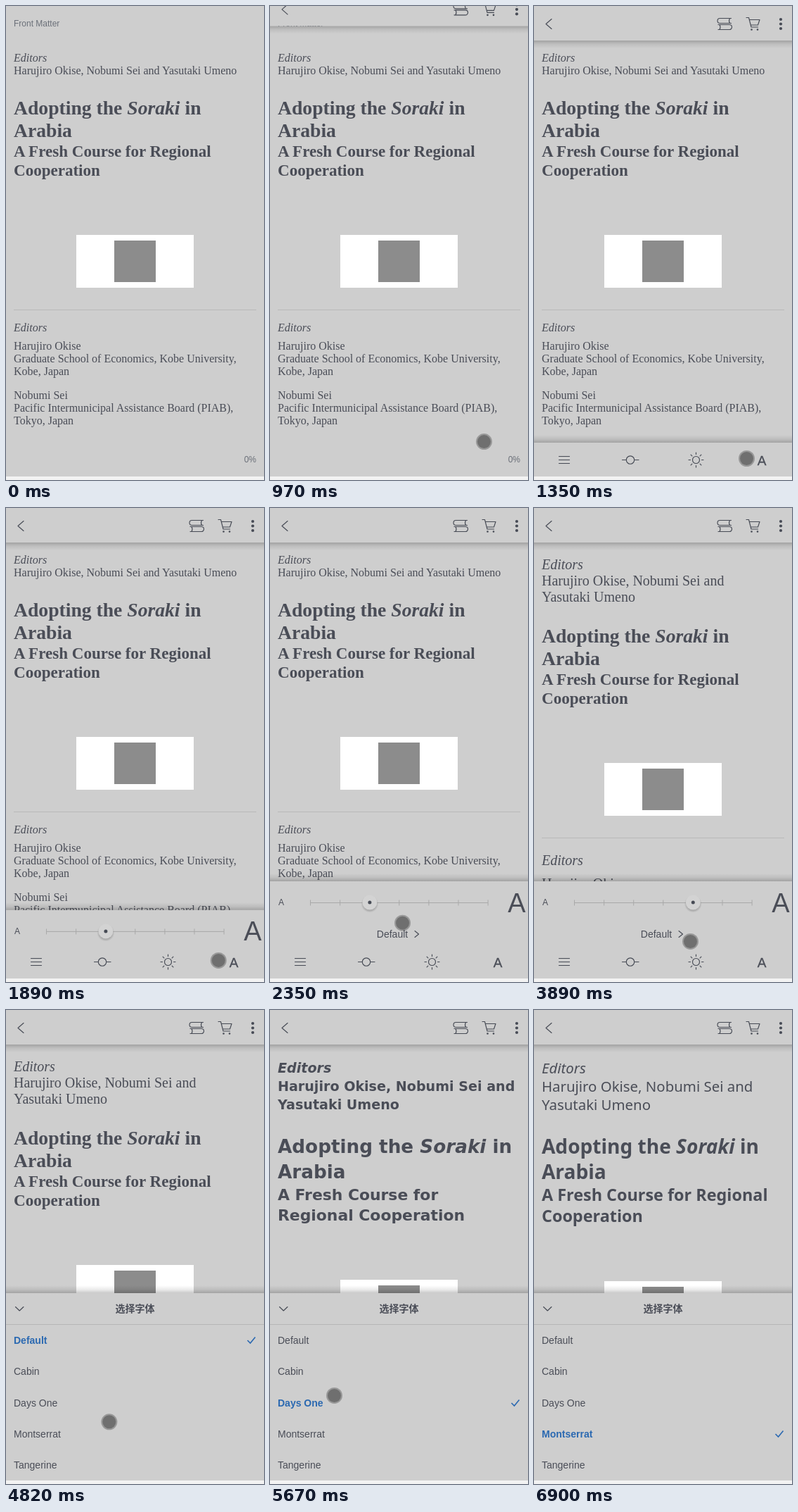
An HTML page for the animation above (7.36 s loop, 367 by 673 pixels).

```html
<!DOCTYPE html>
<html lang="en">
<head>
<meta charset="utf-8">
<title>Reader font settings</title>
<style>
  html, body { margin: 0; width: 100%; height: 100%; overflow: hidden; background: #cecece; }
  svg { display: block; width: 100%; height: 100%; }
  text { white-space: pre; fill: #4a4d57; }
  .ui text { font-family: "Liberation Sans", Arial, sans-serif; }
  .ui .cjk { font: 700 14px "Noto Sans CJK SC", "Noto Sans CJK", sans-serif; }
  .ui .soft { fill: #6b7079; }
  .surface { fill: #cecece; }
  .icon { fill: none; stroke: #474b55; stroke-width: 1.15; stroke-linecap: round; stroke-linejoin: round; }
  .solid { fill: #474b55; }
  .item.on text { fill: #2b69b1; font-weight: 700; }
  .item path { display: none; fill: none; stroke: #2b69b1; stroke-width: 1.6; }
  .item.on path { display: inline; }
</style>
</head>
<body>
<svg id="stage" viewBox="0 0 367 673"></svg>
<script>
const LOOP = 7360;
const SLIDE = 310;
const FONTS = ['Default', 'Cabin', 'Days One', 'Montserrat', 'Tangerine'];
const SERIF = "'Liberation Serif', 'Times New Roman', serif";
const EDITORS = ['Harujiro Okise', 'Nobumi Sei', 'Yasutaki Umeno'];

// lead: body line spacing; top, title, sub: first baselines; head: heading scale; font: chosen list entry
const PAGES = [
  { from: 0, font: 0, size: 16, lead: 18, top: 79, title: 154, sub: 214, logo: 325 },
  { from: 2960, font: 0, size: 18, lead: 21, top: 83, title: 183, sub: 243, logo: 354 },
  { from: 3500, font: 0, size: 20, lead: 23, top: 87, title: 191, sub: 251, logo: 362 },
  { from: 5430, font: 2, size: 19.1, lead: 26, top: 89, title: 203, sub: 270, logo: 383,
    family: "'DejaVu Sans', sans-serif", weight: 700, head: 0.95, titleLead: 36, subLead: 29, breakEarly: true },
  { from: 6360, font: 3, size: 20.4, lead: 26, top: 90, title: 204, sub: 271, logo: 385,
    family: "'Noto Sans', 'Open Sans', sans-serif", head: 1.016, titleLead: 36, subLead: 30 },
];

// time, x, y
const TOUCH = [
  [70, 293, 664], [500, 220, 526], [650, 220, 526], [970, 304.5, 618.5], [1200, 302.5, 642.5],
  [1890, 302.5, 642.5], [2430, 169, 580], [2730, 182, 571], [2960, 183, 569], [3350, 226, 567],
  [3500, 226, 567], [3890, 222.5, 615.5], [4190, 212, 608], [4430, 212, 608], [5120, 97, 567],
  [5430, 92, 563], [5600, 92, 556], [5670, 91.5, 547.5], [5830, 91, 540], [5980, 91, 540],
  [6130, 75, 615], [6360, 75, 613], [6800, 105, 690],
];

const text = (x, y, size, content, attrs = '') =>
  `<text x="${x}" y="${y}" font-size="${size}" ${attrs}>${content}</text>`;
const icon = d => `<path class="icon" d="${d}"/>`;
const rect = (x, y, w, h, attrs) => `<rect x="${x}" y="${y}" width="${w}" height="${h}" ${attrs}/>`;
const circle = (x, y, r, attrs) => `<circle cx="${x}" cy="${y}" r="${r}" ${attrs}/>`;
const lines = (x, y, lead, size, rows, attrs) =>
  rows.map((row, i) => text(x, y + i * lead, size, row, attrs)).join('');

function page(p) {
  const { size, lead, head = 1, logo } = p;
  const [first, second, third] = EDITORS;
  const names = size === 16
    ? [`${first}, ${second} and ${third}`]
    : [`${first}, ${second} and`, third];
  const subtitle = p.breakEarly
    ? ['A Fresh Course for', 'Regional Cooperation']
    : ['A Fresh Course for Regional', 'Cooperation'];
  const italic = 'font-style="italic"', bold = 'font-weight="700"';
  const label = logo + 137 + (size - 16) * 2;
  const about = label + 26 + (size - 16) * 1.8;
  return `<g class="page" font-family="${p.family || SERIF}" font-weight="${p.weight || 400}">
    ${text(11, p.top, size, 'Editors', italic)}
    ${lines(11, p.top + lead, lead, size, names)}
    ${lines(11, p.title, p.titleLead || 32, 27.65 * head,
      ['Adopting the <tspan font-style="italic">Soraki</tspan> in', 'Arabia'], bold)}
    ${lines(11, p.sub, p.subLead || 27, 23.04 * head, subtitle, bold)}
    ${rect(100, logo, 167, 75, 'fill="#fff"')}
    ${rect(154, logo + 8, 59, 59, 'fill="#8c8c8c"')}
    ${rect(11, logo + 106, 345, 1, 'fill="#b9b9b9"')}
    ${text(11, label, size, 'Editors', italic)}
    ${lines(11, about, lead, size, [first, 'Graduate School of Economics, Kobe University,', 'Kobe, Japan'])}
    ${lines(11, about + lead * 3 + 16, lead, size,
      [second, 'Pacific Intermunicipal Assistance Board (PIAB),', 'Tokyo, Japan'])}
  </g>`;
}

const topBar = `<g id="topBar" class="ui">
  ${rect(0, 49, 367, 11, 'fill="url(#shadeDown)"')}
  ${rect(0, -12, 367, 61, 'class="surface"')}
  ${icon('M25 18.5L17 25.5L25 32.5')}
  ${icon('M280.5 17.5H264.500a3.500 3.500 0 0 0 0 7H280.5M278.5 17.5q-2 3.5 0 7')}
  ${icon('M262 26.5H278a3.500 3.500 0 0 1 0 7H262M264 26.5q2 3.5 0 7')}
  ${icon('M302 16.5h3.5l3.5 13.5h9.5M306.5 19.5h14.5l-2.5 7.5h-10')}
  ${[309.5, 318].map(x => circle(x, 33.5, 1.3, 'class="solid"')).join('')}
  ${[19, 25.5, 32].map(y => circle(351, y, 2.1, 'class="solid"')).join('')}
</g>`;

const ticks = Array.from({ length: 7 }, (_, i) => `M${57.5 + i * 42.1} 556.5v8`).join('');
const settings = `<g id="settings" class="ui">
  ${rect(0, 519, 367, 11, 'fill="url(#shadeUp)"')}
  ${rect(0, 530, 367, 150, 'class="surface"')}
  ${text(16, 564, 12, 'A', 'text-anchor="middle"')}
  ${text(351, 573.5, 38, 'A', 'text-anchor="middle"')}
  <path d="M57 560.5H310${ticks}" fill="none" stroke="#a9a9a9"/>
  <g id="knob">
    ${circle(0, 562, 12.5, 'fill="url(#knobShade)"')}
    ${circle(0, 560, 10.5, 'fill="#d3d3d3"')}
    ${circle(0, 560, 2.5, 'class="solid"')}
  </g>
  ${text(174, 610, 14, 'Default', 'text-anchor="middle"')}
  ${icon('M206 600.5l5.5 4.5l-5.5 4.5')}
</g>`;

const rays = Array.from({ length: 8 }, (_, i) => {
  const c = Math.cos(i * Math.PI / 4), s = Math.sin(i * Math.PI / 4);
  return `M${230.5 + 8 * c} ${644.5 + 8 * s}l${2.5 * c} ${2.5 * s}`;
}).join('');
const toolbar = `<g id="toolbar" class="ui">
  ${rect(0, 620, 367, 60, 'class="surface"')}
  ${icon('M35.5 639.5h15M35.5 644.5h15M35.5 649.5h15')}
  ${icon('M125.5 644.5h6M143 644.5h6')}
  ${circle(137, 644.5, 5.7, 'class="icon"')}
  ${circle(230.5, 644.5, 5, 'class="icon"')}
  ${icon(rays)}
  ${text(324, 651.5, 19, 'A', 'text-anchor="middle" stroke="#474b55" stroke-width=".3"')}
</g>`;

const picker = `<g id="picker" class="ui">
  ${rect(0, 391, 367, 11, 'fill="url(#shadeUp)"')}
  ${rect(0, 402, 367, 280, 'class="surface"')}
  ${rect(0, 446, 367, 1, 'fill="#b6b6b6"')}
  ${icon('M13.5 421.5l5.7 5.5l5.7 -5.5')}
  ${text(183.5, 429, 14, '选择字体', 'class="cjk" text-anchor="middle"')}
  ${FONTS.map((name, i) => {
    const y = Math.round(474 + i * 44.25);
    return `<g class="item">${text(11, y, 14, name)}<path d="M343.5 ${y - 5}l4 4l7 -8.5"/></g>`;
  }).join('')}
</g>`;

const shade = (id, y1, y2) => `<linearGradient id="${id}" x1="0" x2="0" y1="${y1}" y2="${y2}">
  <stop offset="0" stop-opacity=".21"/><stop offset=".45" stop-opacity=".08"/><stop offset="1" stop-opacity="0"/>
</linearGradient>`;

const stage = document.getElementById('stage');
stage.innerHTML = `<defs>
    ${shade('shadeDown', 0, 1)}${shade('shadeUp', 1, 0)}
    <radialGradient id="knobShade">
      <stop offset=".7" stop-opacity=".2"/><stop offset="1" stop-opacity="0"/>
    </radialGradient>
  </defs>
  ${rect(0, 0, 367, 673, 'class="surface"')}
  <g class="ui">
    ${text(11, 29, 12, 'Front Matter', 'class="soft"')}
    ${text(356, 648, 12, '0%', 'class="soft" text-anchor="end"')}
  </g>
  ${PAGES.map(page).join('')}
  ${topBar}${settings}${toolbar}${picker}
  ${rect(0, 668, 367, 5, 'fill="#f3f3f3"')}
  <g id="touch">
    ${circle(0, 0, 11.5, 'fill-opacity=".26"')}
    ${circle(0, 0, 9.5, 'fill-opacity=".27"')}
  </g>`;

const part = id => document.getElementById(id);
const move = (id, x, y) => part(id).setAttribute('transform', `translate(${x} ${y})`);
const pages = [...stage.querySelectorAll('.page')];
const items = [...stage.querySelectorAll('.item')];

// Remaining distance of a panel that starts sliding in at `start`
function remaining(t, start, distance) {
  const p = Math.min(1, Math.max(0, (t - start) / SLIDE));
  return distance * (1 - p) ** 2;
}

function touchAt(t) {
  const next = TOUCH.findIndex(key => key[0] > t);
  if (next < 1) return null;
  const [t0, x0, y0] = TOUCH[next - 1], [t1, x1, y1] = TOUCH[next];
  const p = (t - t0) / (t1 - t0);
  return [x0 + (x1 - x0) * p, y0 + (y1 - y0) * p];
}

function draw(t) {
  const current = PAGES.findLastIndex(p => t >= p.from);
  pages.forEach((el, i) => { el.style.display = i === current ? '' : 'none'; });
  items.forEach((el, i) => el.classList.toggle('on', i === PAGES[current].font));

  const barOffset = remaining(t, 970, 62);
  move('topBar', 0, -remaining(t, 840, 62));
  move('toolbar', 0, barOffset);
  move('settings', 0, barOffset + remaining(t, 1790, 90));
  move('knob', 57.5 + 42.2 * (2 + Math.min(current, 2)), 0);
  move('picker', 0, remaining(t, 4480, 282));

  const touch = touchAt(t);
  part('touch').style.display = touch ? '' : 'none';
  if (touch) move('touch', ...touch);
}

const start = performance.now();
function tick() {
  draw((performance.now() - start) % LOOP);
  requestAnimationFrame(tick);
}
tick();
</script>
</body>
</html>
```
